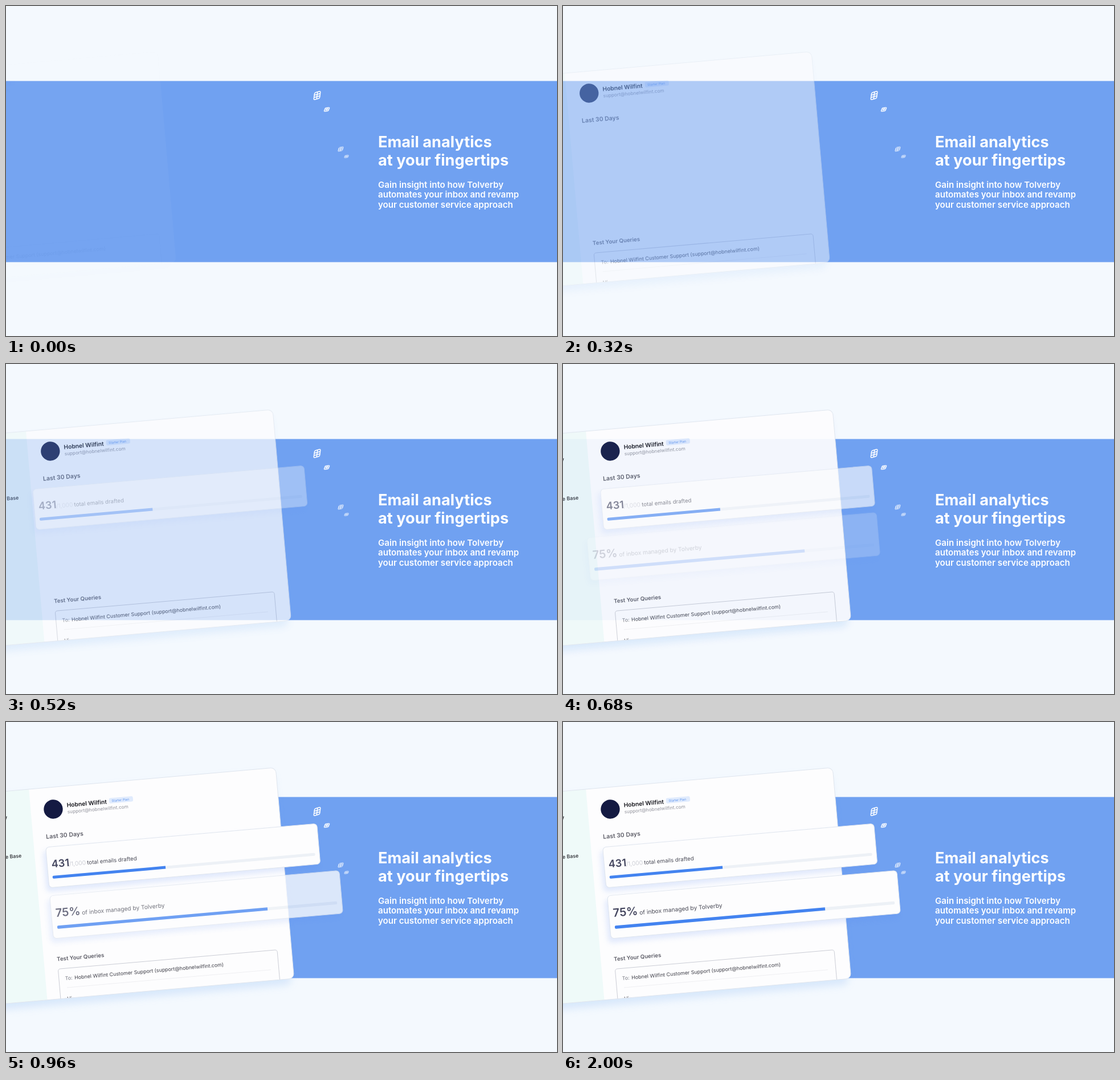
An HTML page that plays this animation: 967x579 px, repeating every 3.96 s.

```html
<!DOCTYPE html>
<html lang="en">
<head>
<meta charset="utf-8">
<title>Email analytics</title>
<style>
  html, body { margin: 0; width: 100%; height: 100%; overflow: hidden; background: #f4f9fe; }
  svg { display: block; width: 100vw; height: 100vh; font-family: Inter, sans-serif; }
  .sheet { fill: #fdfdfe; stroke: #dfe5ee; }
  .track { fill: #edf1f6; }
  .fill { fill: #4383f0; }
  .figure { fill: #44465f; font-weight: 600; }
  .label { fill: #4a4b57; }
  .heading { fill: #5c5c66; font-weight: 600; }
  #panel { filter: drop-shadow(-5px 10px 7px rgba(90, 155, 240, .18)); }
  .card { filter: drop-shadow(-4px 7px 5px rgba(80, 130, 240, .16)); }
  .tile { fill: none; stroke: #fff; }
  #tile * { vector-effect: non-scaling-stroke; }
</style>
</head>
<body>
<svg viewBox="0 0 967 579">
  <defs>
    <clipPath id="panelShape"><rect x="-800" width="799.2" height="371.2" rx="9"/></clipPath>
    <g id="tile">
      <rect x="-1" y="-1" width="2" height="2" rx=".35"/>
      <path d="M0-1V1M-1-.33H1M-1 .33H1"/>
    </g>
  </defs>

  <rect y="131.6" width="967" height="317.8" fill="#70a1f1"/>

  <g fill="#fdfeff">
    <g font-size="27.2" font-weight="700">
      <text x="653" y="247.7">Email analytics</text>
      <text x="653" y="279.7">at your fingertips</text>
    </g>
    <g font-size="15.1" font-weight="600">
      <text x="653" y="318.6">Gain insight into how Tolverby</text>
      <text x="653" y="336.4">automates your inbox and revamp</text>
      <text x="653" y="354.4">your customer service approach</text>
    </g>
  </g>

  <g class="tile">
    <use href="#tile" transform="matrix(5.2 -1.5 -.8 6.3 546 157)" stroke-width="1.5"/>
    <use href="#tile" transform="matrix(3.9 -.4 -1.2 3.1 563 181.5)" stroke-width="1.1"/>
    <use href="#tile" transform="matrix(3.9 -.8 -.9 3.4 587.4 251)" stroke-width="1" opacity=".85"/>
    <use href="#tile" transform="matrix(3.3 -.4 -.6 2.1 597.5 264)" stroke-width="1" opacity=".65"/>
  </g>

  <!-- Tilted parts share an origin at the panel's top right corner. -->
  <g id="panel"><g transform="translate(474 80) rotate(-5)">
    <g clip-path="url(#panelShape)">
      <rect x="-800" width="800" height="372" fill="#fdfdfe"/>
      <rect x="-800" width="364.5" height="372" fill="#effaf9"/>
      <g fill="#26262c" font-weight="500" text-anchor="end">
        <text x="-477.7" y="50" font-size="11">Tolverby</text>
        <text x="-458.5" y="118" font-size="8.9">Knowledge Base</text>
      </g>

      <circle cx="-395.9" cy="38.6" r="16.7" fill="#141a42"/>
      <text x="-371.7" y="37.2" font-size="10.25" font-weight="600" fill="#16161c">Hobnel Wilfint</text>
      <rect x="-297" y="28" width="42" height="9.2" rx="2.5" fill="#e0ebfd"/>
      <text x="-292.7" y="34.8" font-size="5.6" fill="#5f95ef">Starter Plan</text>
      <text x="-371.6" y="48.3" font-size="8.25" fill="#92939c">support@hobnelwilfint.com</text>

      <text class="heading" x="-412.9" y="89.3" font-size="10.5">Last 30 Days</text>
      <text class="heading" x="-412.6" y="304.7" font-size="9.7">Test Your Queries</text>

      <rect x="-412" y="318.7" width="386" height="90" rx="4" fill="none" stroke="#cbcdd5"/>
      <path d="M-399.3 352.5H-40" stroke="#efeff2"/>
      <g font-size="8.9" fill="#3f3f48">
        <text x="-401.1" y="339.3" fill="#777983">To:</text>
        <text x="-384.6" y="339.3">Hobnel Wilfint Customer Support (support@hobnelwilfint.com)</text>
        <text x="-400.7" y="375">Hi,</text>
      </g>
    </g>
    <rect class="sheet" x="-800" width="799.2" height="371.2" rx="9" style="fill:none"/>
  </g></g>

  <g id="drafted" class="card"><g transform="translate(474 80) rotate(-5)">
    <rect class="sheet" x="-415" y="104" width="477.7" height="71.2" rx="6"/>
    <text class="figure" x="-407.5" y="140.5" font-size="18.2">431</text>
    <text x="-376.7" y="140.5" font-size="10.3" font-weight="300" fill="#bfc1ca">/1,000</text>
    <text class="label" x="-345" y="140.5" font-size="9.7">total emails drafted</text>
    <rect class="track" x="-407.5" y="155" width="462.5" height="5" rx="2"/>
    <path class="fill" d="M-208.5 155v5h-197a2 2 0 0 1-2-2v-1a2 2 0 0 1 2-2z"/>
  </g></g>

  <g id="managed" class="card"><g transform="translate(474 80) rotate(-5)">
    <rect class="sheet" x="-414.4" y="189.5" width="510" height="75.5" rx="6"/>
    <text class="figure" x="-407" y="227.4" font-size="20">75%</text>
    <text class="label" x="-360.7" y="227.4" font-size="10.2">of inbox managed by Tolverby</text>
    <rect class="track" x="-406" y="243" width="493" height="5.4" rx="2"/>
    <path class="fill" d="M-35.6 243v5.4h-368.4a2 2 0 0 1-2-2v-1.4a2 2 0 0 1 2-2z"/>
  </g></g>
</svg>

<script>
const LOOP = 3960, STEP = 40;
const entrances = [
  { id: 'panel', start: -26, end: 734, distance: 230 },
  { id: 'drafted', start: 332, end: 890, distance: 78 },
  { id: 'managed', start: 580, end: 1080, distance: 70 },
].map(part => ({ ...part, node: document.getElementById(part.id) }));

// Parts slide in with a cubic ease-out while fading in linearly.
function draw(time) {
  for (const { node, start, end, distance } of entrances) {
    const progress = Math.min(1, Math.max(0, (time - start) / (end - start)));
    node.setAttribute('transform', `translate(${-distance * (1 - progress) ** 3} 0)`);
    node.setAttribute('opacity', progress);
  }
}

function tick() {
  const time = Math.floor(performance.now() % LOOP / STEP) * STEP;
  draw(time < 2 * STEP ? 0 : time); // the first pose is held for two steps
  requestAnimationFrame(tick);
}
tick();
</script>
</body>
</html>
```
